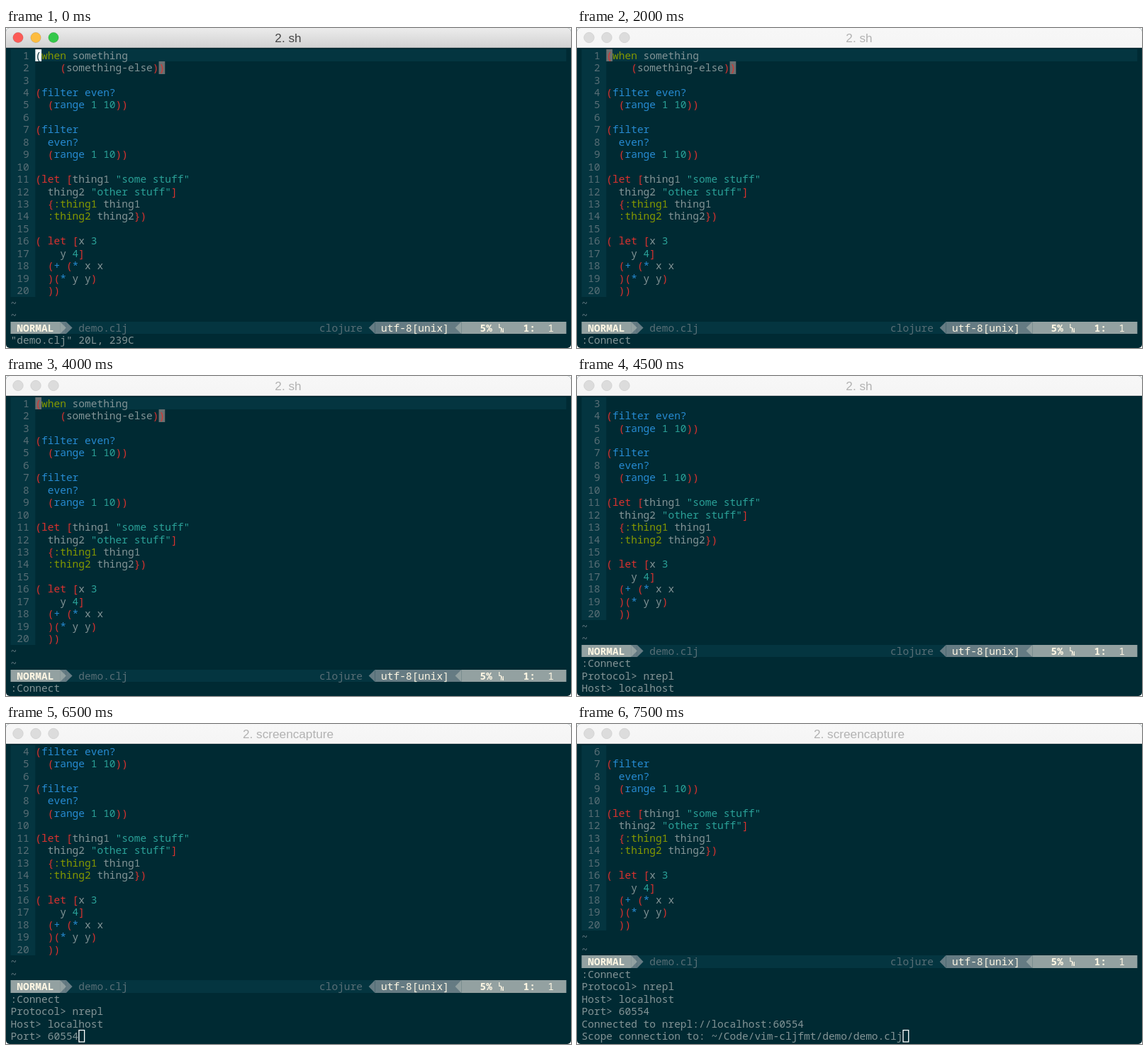
Recreate the animation shown at these times as an HTML page with a canvas. Size 797 by 451 pixels, loop 8000 ms.

```html
<!DOCTYPE html>
<html lang="en">
<head>
<meta charset="utf-8">
<title>Terminal session</title>
<style>
  html, body { margin: 0; width: 100%; height: 100%; overflow: hidden; background: #fff; }
  canvas { display: block; }
</style>
</head>
<body>
<canvas id="stage" width="797" height="451"></canvas>
<script>
const ctx = document.getElementById('stage').getContext('2d');
const LOOP = 8000, LEFT = 6.5, TOP = 29.6, CELL_W = 8.71, CELL_H = 17.45, LAST_ROW = 23;
const MONO = '"Noto Sans Mono", "DejaVu Sans Mono", monospace';
const C = {
  bg: '#002a33', band: '#043540', text: '#839496', dim: '#586e75', mid: '#657b83',
  light: '#93a1a1', cream: '#fdf6e3', match: '#6b6f70',
  red: '#dc322f', blue: '#268bd2', green: '#859900', cyan: '#2aa198'
};

const source = `(when something
    (something-else))

(filter even?
  (range 1 10))

(filter
  even?
  (range 1 10))

(let [thing1 "some stuff"
  thing2 "other stuff"]
  {:thing1 thing1
  :thing2 thing2})

( let [x 3
    y 4]
  (+ (* x x
  )(* y y)
  ))`.split('\n');

const menu = ['Protocol>', ' 1. nrepl', 'Type number and <Enter> or click with mouse (empty cancels): '];
const host = [':Connect', 'Protocol> nrepl', 'Host> localhost'];
const port = [...host, 'Port> 60554'];
const scope = [...port, 'Connected to nrepl://localhost:60554',
  'Scope connection to: ~/Code/vim-cljfmt/demo/demo.clj'];

// Each step: start time, command lines, cursor column on the last line.
const steps = [
  { at: 0, lines: ['"demo.clj" 20L, 239C'] },
  { at: 500, lines: [':'], cursor: 1 },
  { at: 1000, lines: [':Conn'], cursor: 5 },
  { at: 1500, lines: [':Connect'], cursor: 8 },
  { at: 2000, lines: [':Connect'] },
  { at: 3000, lines: menu, cursor: 61 },
  { at: 3500, lines: [menu[0], menu[1], menu[2] + '1'], cursor: 62 },
  { at: 4000, lines: [':Connect'] },
  { at: 4500, lines: host },
  { at: 5000, lines: host, cursor: 15 },
  { at: 5500, lines: host, cursor: 0 },
  { at: 6000, lines: [...host, 'Port> '], cursor: 6 },
  { at: 6500, lines: port, cursor: 11 },
  { at: 7000, lines: scope, cursor: 52 }
];

const x = col => LEFT + col * CELL_W;
const y = row => TOP + row * CELL_H;

function cells(col, row, count, color) {
  ctx.fillStyle = color;
  const top = Math.round(y(row));
  ctx.fillRect(x(col), top, count * CELL_W, Math.round(y(row + 1)) - top);
}

function write(text, col, row, color, weight = 'normal') {
  ctx.font = `${weight} 14.5px ${MONO}`;
  ctx.textAlign = 'left';
  ctx.fillStyle = color;
  const base = Math.round(y(row) + 14);
  [...text].forEach((ch, i) => ch !== ' ' && ctx.fillText(ch, x(col + i), base));
}

function arrow(col, row, color, direction) {
  const from = x(direction > 0 ? col : col + 1);
  const top = Math.round(y(row)), bottom = Math.round(y(row + 1));
  ctx.fillStyle = color;
  ctx.beginPath();
  ctx.moveTo(from, top);
  ctx.lineTo(from + direction * CELL_W, (top + bottom) / 2);
  ctx.lineTo(from, bottom);
  ctx.fill();
}

function tokenColor(token) {
  if (/^([()[\]{}]|let)$/.test(token)) return C.red;
  if (/^["\d]/.test(token)) return C.cyan;
  if (/^(:.+|when)$/.test(token)) return C.green;
  if (/^(filter|even\?|range|[+*])$/.test(token)) return C.blue;
  return C.text;
}

function drawTitle(title, active) {
  const shade = ctx.createLinearGradient(0, 0, 0, 27);
  shade.addColorStop(0, active ? '#ececec' : '#f7f7f7');
  shade.addColorStop(1, active ? '#d2d2d2' : '#f5f5f5');
  ctx.fillStyle = shade;
  ctx.fillRect(0, 0, 797, 27);
  ctx.fillStyle = active ? '#b4b4b4' : '#d8d8d8';
  ctx.fillRect(0, 27, 797, 1);
  ['#fc5b57', '#fdbc40', '#34c84a'].forEach((color, i) => {
    ctx.beginPath();
    ctx.arc(17 + 25 * i, 13.5, 7.2, 0, 2 * Math.PI);
    ctx.fillStyle = active ? color : '#dcdcdc';
    ctx.fill();
    ctx.lineWidth = 0.8;
    ctx.strokeStyle = active ? 'rgba(0,0,0,.14)' : '#cecece';
    ctx.stroke();
  });
  ctx.font = '17.2px "Liberation Sans", Arial, sans-serif';
  ctx.textAlign = 'center';
  ctx.fillStyle = active ? '#464646' : '#b2b2b2';
  ctx.fillText(title, 398, 20);
}

function drawCode(scroll, active) {
  source.forEach((line, i) => {
    const row = i - scroll;
    if (row < 0) return;
    cells(0, row, i ? 4 : 90, C.band);
    write(String(i + 1).padStart(3), 0, row, C.dim);
    if (i === 0) cells(4, row, 1, active ? '#fff' : C.match);
    if (i === 1) cells(24, row, 1, C.match);
    for (const { 0: token, index } of line.matchAll(/"[^"]*"|:?[\w?-]+|\S/g)) {
      const underCursor = active && i === 0 && index === 0;
      write(token, 4 + index, row, underCursor ? C.bg : tokenColor(token));
    }
  });
  for (const row of [20, 21]) write('~', 0, row - scroll, C.mid);
}

function drawStatus(row) {
  cells(0, row, 90, C.band);
  cells(0, row, 8, C.light);
  cells(8, row, 1, C.mid);
  arrow(8, row, C.light, 1);
  arrow(9, row, C.mid, 1);
  arrow(58, row, C.mid, -1);
  cells(59, row, 14, C.mid);
  arrow(72, row, C.light, -1);
  cells(73, row, 17, C.light);
  write('NORMAL', 1, row, C.cream, 'bold');
  write('demo.clj', 11, row, C.dim);
  write('clojure', 50, row, C.dim);
  write('utf-8[unix]', 60, row, C.cream);
  write('5%', 76, row, C.cream, 'bold');
  write('1:', 83, row, C.cream, 'bold');
  write('1', 87, row, C.cream);
  ctx.font = `bold 8px ${MONO}`;
  ctx.fillText('L', x(79), y(row) + 9);
  ctx.fillText('N', x(79) + 3, y(row) + 15);
}

function draw(time) {
  const { lines, cursor } = steps.findLast(step => step.at <= time);
  const active = time < 500;
  const scroll = lines.length - 1;

  ctx.clearRect(0, 0, 797, 451);
  ctx.save();
  ctx.beginPath();
  ctx.roundRect(0, 0, 797, 451, 5);
  ctx.clip();
  ctx.fillStyle = C.bg;
  ctx.fillRect(0, 0, 797, 451);
  drawTitle(time < 6000 ? '2. sh' : '2. screencapture', active);
  drawCode(scroll, active);
  drawStatus(LAST_ROW - 1 - scroll);
  lines.forEach((line, i) => write(line, 0, LAST_ROW - scroll + i, C.text));
  if (cursor !== undefined) {
    ctx.strokeStyle = '#fff';
    ctx.lineWidth = 1.3;
    ctx.strokeRect(x(cursor) + 0.6, y(LAST_ROW) + 0.6, CELL_W - 1, CELL_H - 1);
  }
  ctx.restore();
}

function tick() {
  draw(performance.now() % LOOP);
  requestAnimationFrame(tick);
}
tick();
</script>
</body>
</html>
```
